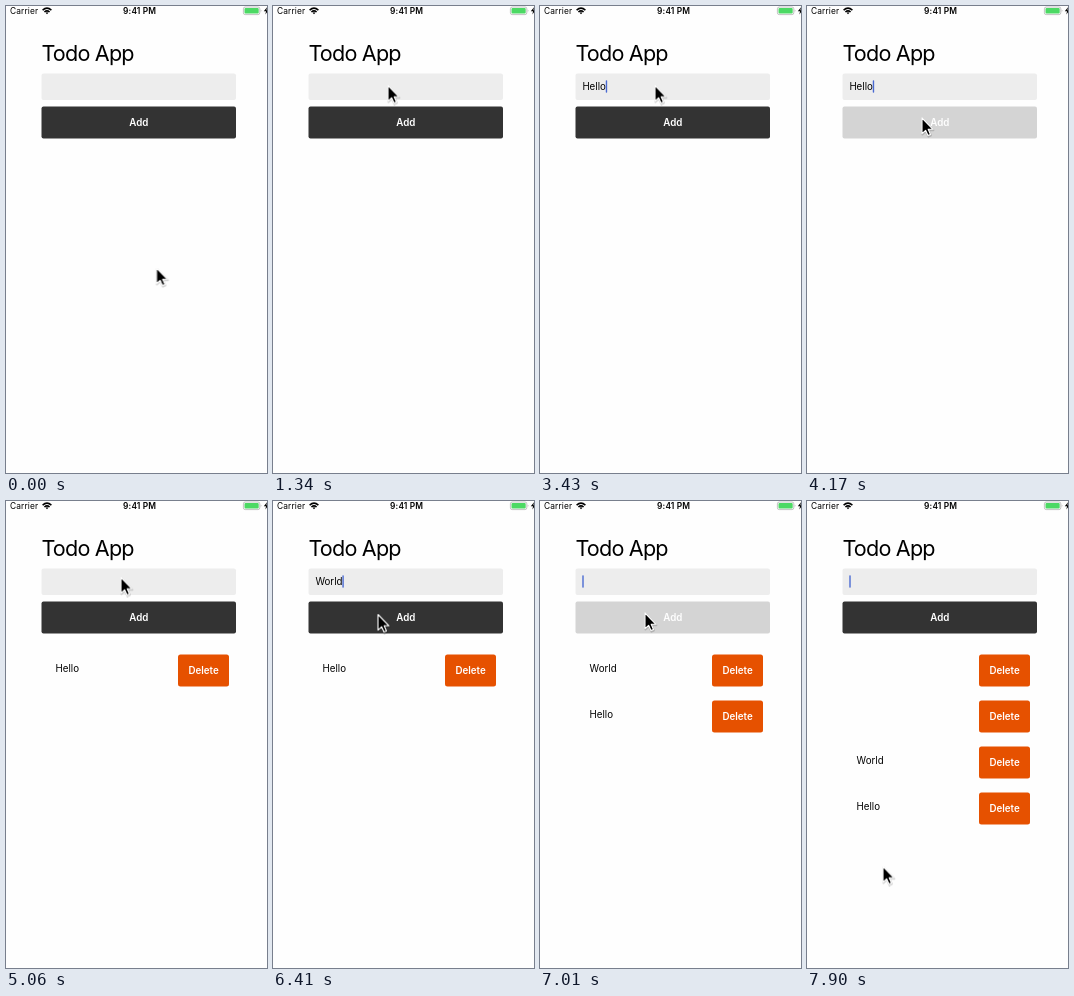
Write an HTML page that moves like this. It is 261 by 467 pixels and loops after 8000 ms.

```html
<!DOCTYPE html>
<html lang="en">
<head>
<meta charset="utf-8">
<title>Todo App</title>
<style>
  html, body { margin: 0; width: 100%; height: 100%; overflow: hidden; background: #fefefe; }
  svg { display: block; }
  text { font: 9.74px Inter, Roboto, sans-serif; fill: #000; white-space: pre; }
  .status { font-size: 8.4px; letter-spacing: .12px; }
  .title { font-size: 21.6px; letter-spacing: -.8px; }
  .bold { font-weight: 600; }
  .label { fill: #fff; text-anchor: middle; }
  #pointer, #add, #list, #caret { animation: 8s step-end infinite; }
  #pointer { animation-name: point; }
  #add { animation-name: press; }
  #list { animation-name: grow; }
  #caret { animation-name: blink; }

  @keyframes point {
    0% { transform: translate(150.5px, 262px); }
    3.75% { transform: translate(150px, 262.5px); }
    9.375% { transform: translate(148px, 254px); }
    11.25% { transform: translate(139px, 203px); }
    13% { transform: translate(125px, 133px); }
    14.875% { transform: translate(117px, 91px); }
    16.75% { transform: translate(115px, 79.5px); }
    48.5% { transform: translate(115px, 95px); }
    50.375%, 57.75% { transform: translate(115px, 112px); }
    59.625% { transform: translate(115px, 92px); }
    61.375% { transform: translate(115px, 76.5px); }
    78.25% { transform: translate(110px, 96px); }
    80.125% { transform: translate(105px, 113.5px); }
    82% { transform: translate(105px, 112px); }
    96.875% { transform: translate(90px, 245px); }
    98.75%, 100% { transform: translate(76px, 365.5px); }
  }
  @keyframes press {
    0%, 57.75%, 85.75%, 96.875%, 100% { opacity: 1; }
    52.125%, 82%, 87.625%, 93.125% { opacity: .2; }
    55.875%, 83.875%, 91.25%, 95% { opacity: .6; }
  }
  @keyframes grow {
    0% { transform: translateY(-184px); }
    55.875% { transform: translateY(-138px); }
    83.875% { transform: translateY(-92px); }
    91.25% { transform: translateY(-46px); }
    95%, 100% { transform: none; }
  }
  @keyframes blink {
    0%, 26.125%, 63.25%, 91.25% { opacity: 0; }
    20.5%, 28%, 67%, 93.125%, 100% { opacity: 1; }
  }
</style>
</head>
<body>
<svg width="261" height="467" viewBox="0 0 261 467">
  <defs>
    <g id="row">
      <rect x="172" y="3.5" width="51" height="32" rx="2.5" fill="#e65100"/>
      <text class="bold label" x="197.6" y="23.4">Delete</text>
    </g>
  </defs>

  <text class="status" x="4" y="8">Carrier</text>
  <g fill="none" stroke="#000" stroke-width="1.5">
    <path d="M36.6 4.1Q41 .1 45.4 4.1M38.4 6Q41 3.7 43.6 6"/>
    <path d="M39.6 6.8Q41 5.8 42.4 6.8L41 8.3Z" fill="#000" stroke="none"/>
  </g>
  <text class="status bold" x="133.6" y="8" text-anchor="middle">9:41 PM</text>
  <rect x="237.4" y="1" width="16.4" height="7.6" rx="1.8" fill="#fff" stroke="#aaa" stroke-width=".7"/>
  <rect x="238.5" y="2" width="14.2" height="5.6" rx="1" fill="#4cd964"/>
  <path d="M254.8 3.6q1.3 1.2 0 2.5z" fill="#999"/>
  <path d="M261 1.2L257.8 5.3H260L259.4 8.4L262.5 4.2H260.4Z"/>

  <text class="title" x="35.4" y="54.5">Todo App</text>
  <rect x="35.5" y="67.5" width="194.5" height="26.4" rx="2" fill="#ededed"/>
  <text id="entry" x="42.4" y="84.1"></text>
  <rect id="caret" y="74.3" width="1.4" height="12.4" rx=".6" fill="#4a6ad2"/>

  <g id="add">
    <rect x="35.5" y="100.5" width="194.5" height="32" rx="2" fill="#333"/>
    <text class="bold label" x="132.8" y="120.3">Add</text>
  </g>

  <svg y="150" width="261" height="317" overflow="hidden">
    <g id="list">
      <use href="#row"/>
      <use href="#row" y="46"/>
      <use href="#row" y="92"/>
      <text x="49.6" y="112.6">World</text>
      <use href="#row" y="138"/>
      <text x="49.6" y="158.6">Hello</text>
    </g>
  </svg>

  <g id="pointer">
    <path d="M0 0V15.6L3.6 12.3L6 17.6L8.5 16.5L6.2 11.3H11Z" transform="translate(.4 1)"
          fill="none" stroke="#000" stroke-opacity=".16" stroke-width="2" stroke-linejoin="round"/>
    <path d="M0 0V15.6L3.6 12.3L6 17.6L8.5 16.5L6.2 11.3H11Z"
          stroke="#fff" stroke-width="1.1" stroke-linejoin="round"/>
  </g>
</svg>
<script>
  const LOOP = 8000;
  const entry = document.getElementById('entry');
  const caret = document.getElementById('caret');

  // Each word: time of every keystroke, then the time the field is cleared.
  const words = [
    { word: 'Hello', keys: [2680, 2830, 2980, 3130, 3430], clear: 4470 },
    { word: 'World', keys: [5360, 5510, 5660, 5960, 6110], clear: 6710 }
  ];

  function typed(t) {
    const now = words.find(w => t >= w.keys[0] && t < w.clear);
    return now ? now.word.slice(0, now.keys.filter(k => t >= k).length) : '';
  }

  let start, shown;
  function frame(time) {
    start ??= time;
    const value = typed((time - start) % LOOP);
    if (value !== shown) {
      shown = entry.textContent = value;
      const width = value ? entry.getComputedTextLength() : 0;
      caret.setAttribute('x', 42.3 + width);
    }
    requestAnimationFrame(frame);
  }
  requestAnimationFrame(frame);
</script>
</body>
</html>
```
